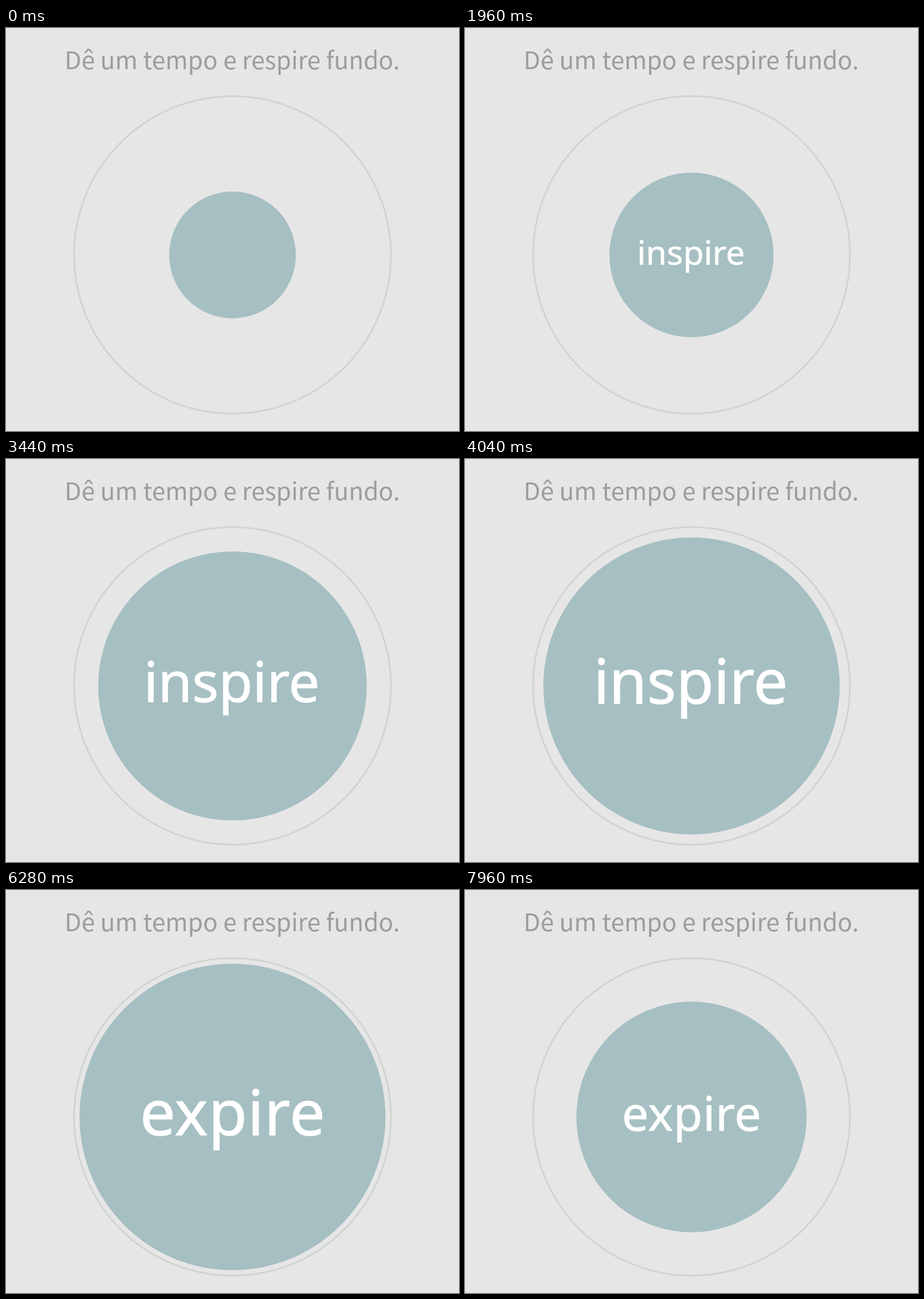
Write an HTML page that moves like this. It is 794x705 px and loops after 8000 ms.

```html
<!DOCTYPE html>
<html lang="pt">
<head>
<meta charset="utf-8">
<title>Respire fundo</title>
<style>
  html, body { margin: 0; width: 100%; height: 100%; overflow: hidden; background: #e6e6e6; }
  svg { display: block; width: 100%; height: 100%; }
  text { text-anchor: middle; }
  .title { font: 42.65px "Noto Sans CJK JP", "Noto Sans CJK SC", "Noto Sans CJK KR", "Noto Sans CJK", "Noto Sans", sans-serif; fill: #9d9d9d; }
  .word { font: 111px "Noto Sans", "Open Sans", sans-serif; fill: #fff; stroke: #fff; stroke-width: 1.2; }
  #exhale { letter-spacing: 0.8px; }
</style>
</head>
<body>
<svg viewBox="0 0 794 705">
  <text class="title" x="396.6" y="72">Dê um tempo e respire fundo.</text>
  <circle cx="397" cy="397" r="277.7" fill="none" stroke="#d0d4d3" stroke-width="3"/>
  <circle id="disc" cx="397" cy="397" fill="#a6bfc2"/>
  <g id="words">
    <text id="inhale" class="word" x="-1.5" y="32">inspire</text>
    <text id="exhale" class="word" x="0.4" y="32">expire</text>
  </g>
</svg>
<script>
const LOOP = 8000, TICK = 40;
const SMALL = 111, LARGE = 269.5;
const GROW = { start: 672, length: 4080 };
const SHRINK = { start: 6032, ramp: 1100, speed: 0.0492 };

const [disc, words, inhale, exhale] =
  ["disc", "words", "inhale", "exhale"].map(id => document.getElementById(id));

// cubic-bezier(.42, 0, .58, 1)
function easeInOut(p) {
  let lo = 0, hi = 1;
  for (let i = 0; i < 24; i++) {
    const s = (lo + hi) / 2, q = 1 - s;
    const x = 3 * q * q * s * 0.42 + 3 * q * s * s * 0.58 + s * s * s;
    if (x < p) lo = s; else hi = s;
  }
  return lo * lo * (3 - 2 * lo);
}

// Accelerates during the ramp, then moves at constant speed
function shrinkBy(t) {
  const { start, ramp, speed } = SHRINK;
  const u = Math.max(0, t - start);
  return speed * (u < ramp ? u * u / (2 * ramp) : u - ramp / 2);
}

function radius(t) {
  const p = Math.min(1, Math.max(0, (t - GROW.start) / GROW.length));
  return SMALL + (LARGE - SMALL) * easeInOut(p) - shrinkBy(t);
}

// Fades advance in five equal steps at the given times
const fade = (t, times) => times.filter(at => t >= at).length / times.length;
const every120 = start => [0, 1, 2, 3, 4].map(i => start + i * 120);
const FADE_IN = every120(120);
const FADE_OUT = [4920, 5040, 5160, 5320, 5440];
const FADE_NEXT = every120(5600);

function draw(t) {
  const r = radius(t);
  disc.setAttribute("r", r);
  words.setAttribute("transform", `translate(397 397) scale(${r / LARGE})`);
  inhale.setAttribute("opacity", fade(t, FADE_IN) - fade(t, FADE_OUT));
  exhale.setAttribute("opacity", fade(t, FADE_NEXT));
}

let origin;
function frame(now) {
  origin ??= now;
  const t = Math.max(0, now - origin) % LOOP;
  draw(Math.floor(t / TICK) * TICK);
  requestAnimationFrame(frame);
}
draw(0);
requestAnimationFrame(frame);
</script>
</body>
</html>
```
